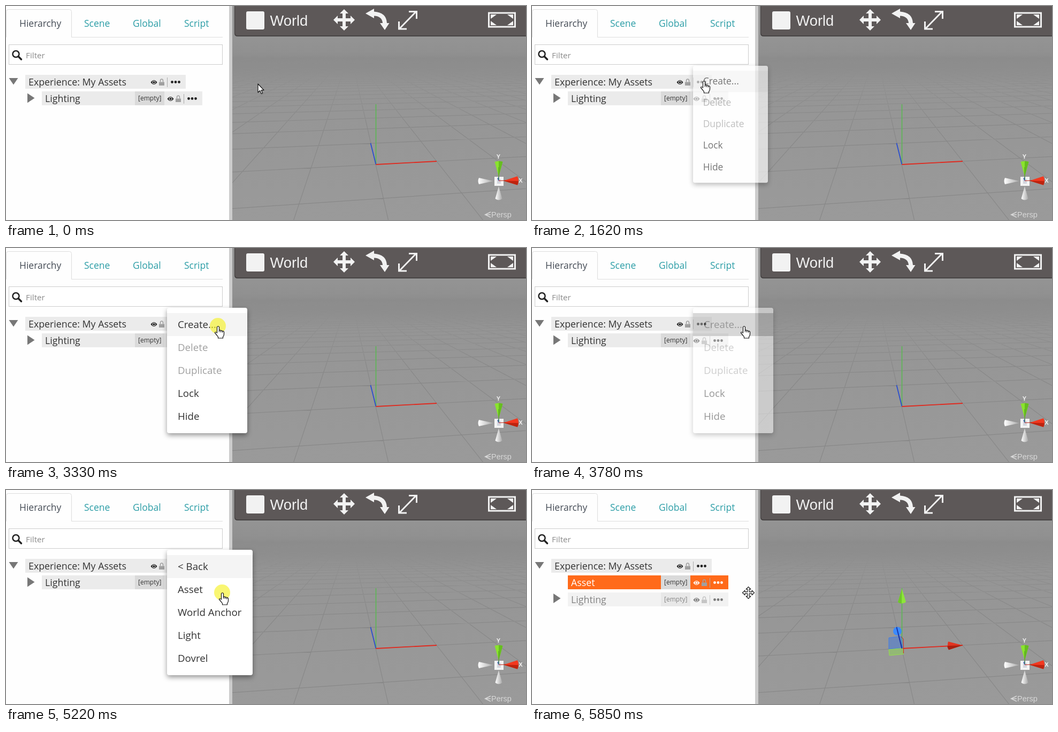
Recreate the animation shown at these times as an HTML page. Size 972 by 401 pixels, loop 7740 ms.

```html
<!DOCTYPE html>
<html lang="en">
<head>
<meta charset="utf-8">
<style>
html, body { margin: 0; width: 100%; height: 100%; overflow: hidden; background: #fefefe; }
svg { display: block; }
text { font-family: "Open Sans", "Noto Sans", sans-serif; }
.tab { font-size: 17.5px; fill: #2b9da6; }
.row { font-size: 17.8px; fill: #333; }
.menu text { font-size: 18.7px; fill: #333; }
.menu .off { fill: #a0a0a0; }
.card { fill: #fff; filter: drop-shadow(0 4px 5px rgba(0,0,0,.4)); }
.arial { font-family: "Liberation Sans", Arial, sans-serif; }
</style>
</head>
<body>
<svg id="stage" width="972" height="401" viewBox="0 0 972 401">
  <defs>
    <linearGradient id="ground" gradientUnits="userSpaceOnUse" x1="0" y1="57" x2="0" y2="401">
      <stop offset="0" stop-color="#949494"/><stop offset=".09" stop-color="#909090"/>
      <stop offset=".12" stop-color="#8c8c8c"/><stop offset=".28" stop-color="#959595"/>
      <stop offset="1" stop-color="#9a9a9a"/>
    </linearGradient>
    <linearGradient id="fade" gradientUnits="userSpaceOnUse" x1="0" y1="92" x2="0" y2="230">
      <stop offset="0" stop-color="#858585" stop-opacity="0"/><stop offset="1" stop-color="#858585" stop-opacity=".85"/>
    </linearGradient>
    <linearGradient id="shade">
      <stop offset="0" stop-color="#fff"/><stop offset="1" stop-color="#a9a9a9"/>
    </linearGradient>
    <clipPath id="view"><rect x="423" y="57" width="549" height="344"/></clipPath>
    <path id="cross" d="M0-10L4-6H1.5V-1.5H6V-4L10 0L6 4V1.5H1.5V6H4L0 10L-4 6H-1.5V1.5H-6V4L-10 0L-6-4V-1.5H-1.5V-6H-4Z"/>
  </defs>

  <!-- tabs and filter -->
  <path d="M.5 58.5V10.5Q.5 6.5 4.5 6.5H118.5Q122.5 6.5 122.5 10.5V58.5H405" fill="none" stroke="#ddd"/>
  <text class="tab" x="25" y="39" style="fill:#444b55">Hierarchy</text>
  <text class="tab" x="146" y="39">Scene</text>
  <text class="tab" x="237" y="39">Global</text>
  <text class="tab" x="333" y="39">Script</text>
  <rect x="5.5" y="72.5" width="399" height="37" fill="#fff" stroke="#ccc"/>
  <path d="M23.5 95L28.5 100" stroke="#222" stroke-width="3.5" stroke-linecap="round"/>
  <circle cx="18.500" cy="90" r="6" fill="none" stroke="#222" stroke-width="2.5"/>
  <text x="37" y="98" font-size="15.300" fill="#8b8b8b">Filter</text>

  <!-- tree -->
  <path d="M5.500 135H22.500L14 147.500Z" fill="#777"/>
  <g id="tree"></g>

  <!-- viewport -->
  <rect x="417" width="10" height="401" fill="#ccc"/>
  <rect x="423" width="549" height="401" fill="url(#ground)"/>
  <g clip-path="url(#view)"><path id="grid" fill="none" stroke="url(#fade)" stroke-width="1.200"/></g>
  <path d="M427 0V51Q427 57 433 57H972V0Z" fill="#3f3c3c"/>
  <path d="M428 0V50Q428 55.500 434 55.500H972V0Z" fill="#5d5858"/>
  <g fill="#f2f2f2">
    <rect x="449" y="10" width="34" height="34" rx="3"/>
    <text class="arial" x="493.500" y="37" font-size="27.300">World</text>
    <use href="#cross" transform="translate(632 26) scale(2)"/>
    <path d="M672 14L688 5V10.500Q711 12 712 32H716.500L708 45L699 32H704Q703 19 688 18.500V23Z"/>
  </g>
  <g fill="none" stroke="#f2f2f2" stroke-width="3">
    <path d="M736 42L766 11M753 10.500H767.500V24M734.500 29V43H749"/>
    <rect x="902.500" y="13" width="49" height="26"/>
  </g>
  <path d="M906 16H917L906 24ZM948 16H937L948 24ZM906 36H917L906 28ZM948 36H937L948 28Z" fill="#f2f2f2"/>

  <g fill="none" stroke-width="1.800">
    <path d="M691.500 184V297" stroke="#5fb558"/>
    <path d="M691.500 297L681.500 257" stroke="#2b4fd0"/>
    <path d="M691.500 297L805 291" stroke="#e02b20"/>
  </g>
  <g id="handles">
    <path d="M667 277L690 274L693 296L667 298Z" fill="#3f78dd" fill-opacity=".5" stroke="#3f7fe8"/>
    <path d="M667 299L693 296.500L694.500 307.500L668 310Z" fill="#8fd45a" fill-opacity=".55" stroke="#95e04c"/>
    <path d="M690 275L694 279L694.500 306" fill="none" stroke="#d02020"/>
    <circle cx="683" cy="264.500" r="8" fill="#3b8bff"/>
    <path d="M681.500 257L691.500 297" stroke="#1a2fa0" stroke-width="1.800"/>
    <path d="M691.500 185L699 210Q691.500 215 684 210Z" fill="#8ee63a"/>
    <path d="M691.500 185L684 210Q687 213 691 212.500Z" fill="#6fc62b"/>
    <path d="M805 291L779 299.500Q775.500 292 778 284Z" fill="#e23420"/>
    <path d="M805 291L779 299.500Q776 295 776.500 292Z" fill="#a8200f"/>
  </g>

  <!-- orientation gizmo -->
  <path d="M911 328L884 322Q881 328 884 334Z" fill="url(#shade)"/>
  <path d="M921 338L914.500 361Q921 366 927.500 361Z" fill="url(#shade)"/>
  <rect x="913" y="320" width="17" height="17" fill="#f4f4f4"/>
  <rect x="918" y="324" width="7" height="9" fill="#d3d6de"/>
  <path d="M921 320V327M921 327L919 322" stroke="#3855c4" stroke-width="1.500"/>
  <path d="M921 319L913.500 292Q921 289 928.500 292Z" fill="#8ae32e"/>
  <path d="M921 319L921 290.500Q926 290.500 928.500 292Z" fill="#66bd20"/>
  <path d="M921 302V326" stroke="#4f9a1c"/>
  <path d="M930 327.500L956 319Q960 327 956 335.500Z" fill="#f2381f"/>
  <path d="M930 327.500L957.500 328Q958 332 956 335.500Z" fill="#bd240f"/>
  <path d="M921 327.500L934 327" stroke="#b82010"/>
  <g class="arial" fill="#f2f2f2" text-anchor="middle" font-weight="bold" font-size="11">
    <text class="arial" x="920.500" y="286">Y</text><text class="arial" x="962" y="331">X</text>
  </g>
  <path d="M906 386L895.500 391L906 396M896 391H906" fill="none" stroke="#d8d8d8" stroke-width="1.400"/>
  <text class="arial" x="907" y="396" font-size="14.500" fill="#d8d8d8">Persp</text>

  <g id="menus"></g>
  <circle id="click" r="15" fill="#f6f01c" opacity=".62"/>
  <g id="cursors" fill="#fff" stroke="#111" stroke-width="1.200" stroke-linejoin="round">
    <path d="M0 0V16L3.700 12.500L6.300 18.500L8.700 17.500L6.200 11.700H11Z"/>
    <path d="M-2 1.500Q0-1 2 1.500V8Q4 6.500 5 8.500Q7 7.500 8 9.500Q10 8.500 11 11V15Q11 18 9 20V22.500H0V20Q-3 16-6 12.500Q-6 9.500-2 12.500ZM2 8V11M5 8.500V11.500M8 9.500V12"/>
    <use href="#cross" transform="scale(1.100)" stroke-width="1"/>
  </g>
</svg>
<script>
const $ = id => document.getElementById(id);
const show = (el, on) => el.setAttribute('visibility', on ? 'visible' : 'hidden');
const clamp = v => Math.max(0, Math.min(1, v));
const mix = (a, b, p) => a + (b - a) * p;
const inOut = p => p < .5 ? 4 * p ** 3 : 1 - 4 * (1 - p) ** 3;

// Ground grid: each line runs through a vanishing point on the horizon.
function gridPath() {
  const horizon = 85, vx = 4720, vz = 643;
  const onAxis = (k, v) => [(691 + k * v) / (1 + k), (297 + k * horizon) / (1 + k)];
  let d = '';
  for (let i = -20; i <= 60; i++) {
    const [x, y] = onAxis(i * .0291, vz === 0 ? 0 : vx);
    d += `M${vz} ${horizon}L${x + 3 * (x - vz)} ${y + 3 * (y - horizon)}`;
  }
  for (let i = -3; i <= 36; i++) {
    const [x, y] = onAxis(i * .23, vz);
    d += `M${vx} ${horizon}L${2 * x - vx} ${2 * y - horizon}`;
  }
  return d;
}
$('grid').setAttribute('d', gridPath());

function row(x, y, name, { empty = true, bg = '#ebebeb', ink = '#333', icon = '#222', opacity = 1 } = {}) {
  const cy = y + 13.5;
  const dots = [-6.5, 0, 6.5].map(dx => `<circle cx="${x + 281 + dx}" cy="${cy}" r="2.4"/>`).join('');
  return `<g opacity="${opacity}"><rect x="${x}" y="${y}" width="300" height="26" fill="${bg}"/>
    <text class="row" x="${x + 6}" y="${y + 20}" style="fill:${ink}">${name}</text>
    ${empty ? `<rect x="${x + 174}" y="${y}" width="55" height="26" fill="#dadada"/>
    <text x="${x + 180}" y="${y + 17}" font-size="12" fill="#333">[empty]</text>` : ''}
    <g transform="translate(${x + 240.5} ${cy + .5})"><path d="M-6 0Q0-8 6 0Q0 8-6 0Z" fill="${icon}"/>
    <circle r="3" fill="${bg}"/><circle r="2.100" fill="${icon}"/></g>
    <path d="M${x + 250} ${cy}h10v6.500h-10z" fill="#a0a0a0"/>
    <path d="M${x + 252.500} ${cy}v-2.500q0-3 2.500-3t2.500 3v2.500" fill="none" stroke="#a0a0a0" stroke-width="1.600"/>
    <path d="M${x + 265.5} ${y + 5}v18" stroke="#aaa"/><g fill="${icon}">${dots}</g></g>`;
}
const arrow = y => `<path d="M40 ${y - 9}L53.500 ${y}L40 ${y + 9}Z" fill="#777"/>`;
$('tree').innerHTML = row(36, 129, 'Experience: My Assets', { empty: false }) +
  `<g id="before">${row(67, 160, 'Lighting')}${arrow(172.5)}</g>
   <g id="after">${row(67, 160, 'Asset', { bg: '#ff6a1a', ink: '#fff', icon: '#fff' })}
   ${row(67, 192, 'Lighting', { opacity: .6 })}${arrow(203)}</g>`;

function makeMenu(width, items, off) {
  const g = document.createElementNS('http://www.w3.org/2000/svg', 'g');
  g.setAttribute('class', 'menu');
  g.innerHTML = `<rect class="card" width="${width}" height="235" rx="4"/>
    <rect y="10" width="${width}" height="43" fill="#f4f4f4"/>
    <svg width="${width}" height="43"><circle fill-opacity=".27"/></svg>` +
    items.map((s, i) => `<text x="20" y="${37.5 + 43 * i}" class="${off.includes(i) ? 'off' : ''}">${s}</text>`).join('');
  $('menus').append(g);
  const [, hover, clip, ripple] = g.querySelectorAll('rect, svg, circle');
  return (opacity, scale, item, cx, cy, r) => {
    show(g, opacity > 0);
    g.setAttribute('opacity', opacity);
    g.setAttribute('transform', `translate(301 112) scale(${scale})`);
    hover.setAttribute('y', 10 + 43 * item);
    hover.setAttribute('opacity', r > 0 && item ? 0 : 1);
    clip.setAttribute('y', 10 + 43 * item);
    ripple.setAttribute('cx', cx);
    ripple.setAttribute('cy', cy);
    ripple.setAttribute('r', Math.max(0, r));
  };
}
const mainMenu = makeMenu(150, ['Create...', 'Delete', 'Duplicate', 'Lock', 'Hide'], [1, 2]);
const createMenu = makeMenu(160, ['&lt; Back', 'Asset', 'World Anchor', 'Light', 'Dovrel'], []);

function pointer(t) {
  if (t < 2160) {
    const p = 1 - (1 - clamp(t / 1000)) ** 1.6;
    return [mix(471, 321.5, p), mix(146, 140.5, p)];
  }
  if (t < 4410) {
    const p = inOut(clamp((t - 2070) / 630));
    return [mix(321.5, 396.5, p), mix(140.5, 146.5, p)];
  }
  const p = clamp((t - 4320) / 450);
  return [mix(396.5, 404.5, p), mix(146.5, 192.5, p)];
}

function draw(t) {
  const done = t >= 5850;
  show($('before'), !done);
  show($('after'), done);
  show($('handles'), done);

  const open = clamp((t - 1440) / 270);
  mainMenu(open * clamp((3870 - t) / 180), mix(.8, 1, open), 0, 95, 24, (t - 3330) * .37);
  const swap = clamp((t - 3780) / 180);
  createMenu(done ? 0 : swap * clamp((5850 - t) / 180), 1, t >= 5400 ? 1 : 0, 103, 27, (t - 5310) * .37 * (t >= 5400));

  const [x, y] = pointer(t);
  const kind = done ? 2 : x < 336 || t > 1000 ? 1 : 0;
  [...$('cursors').children].forEach((c, i) => show(c, i === kind));
  $('cursors').setAttribute('transform', `translate(${x} ${y})`);
  const within = (a, b) => t >= a && t < b;
  show($('click'), within(1170, 1440) || within(3330, 3600) || within(5220, 5670));
  $('click').setAttribute('cx', x - .5);
  $('click').setAttribute('cy', y - .5);
}

const start = performance.now();
function tick() {
  const t = (performance.now() - start) % 7740;
  draw(Math.floor(t / 90) * 90);
  requestAnimationFrame(tick);
}
tick();
</script>
</body>
</html>
```
